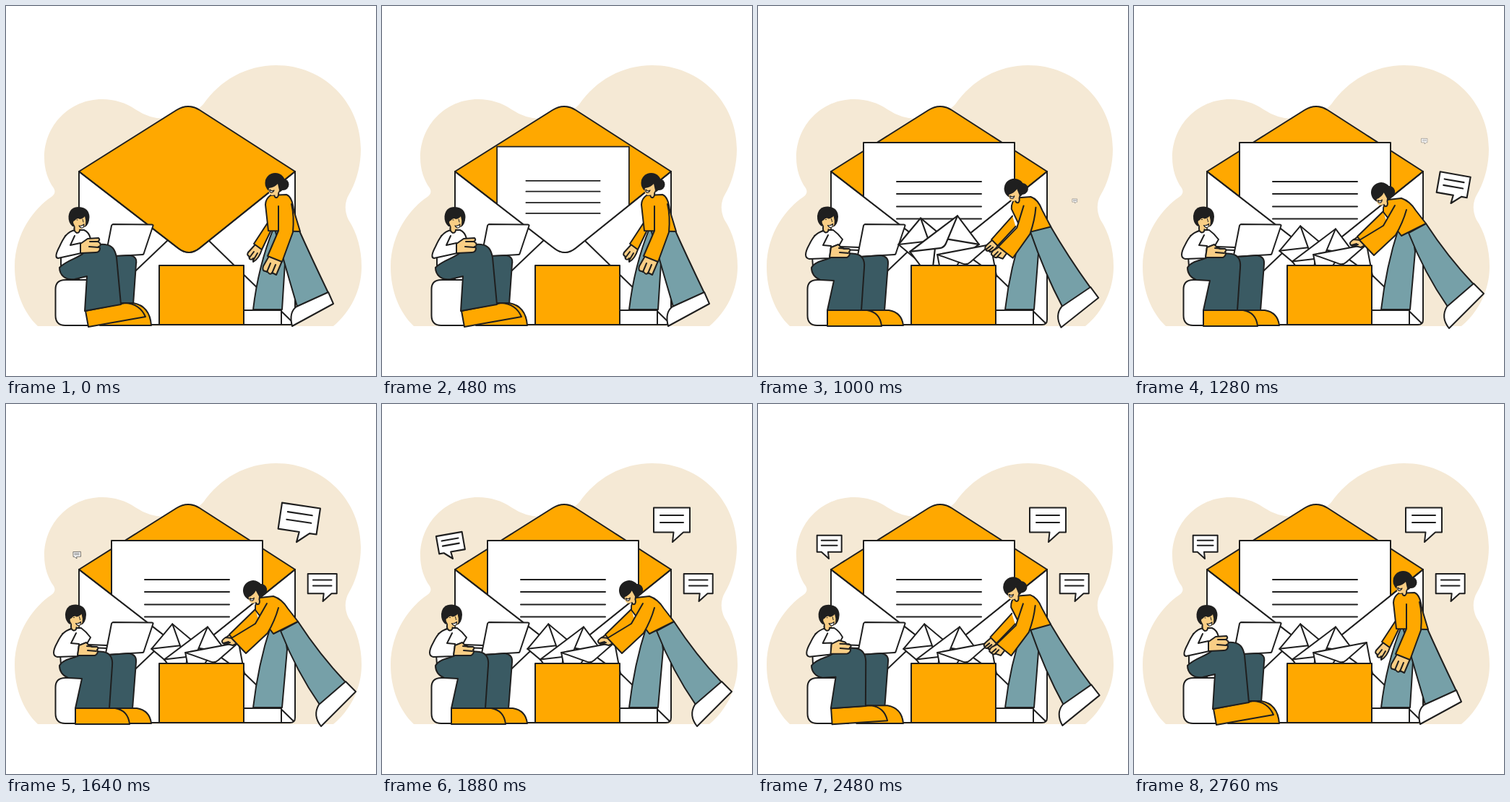
Animation, 512 px wide and 512 px high, one loop 2.88 s. Source, as an HTML page:

```html
<!DOCTYPE html>
<html lang="en">
<head>
<meta charset="utf-8">
<title>Mail</title>
<style>
  html, body { margin: 0; width: 100%; height: 100%; overflow: hidden; background: #fff; }
  svg { display: block; width: 100vw; height: 100vh; }
</style>
</head>
<body>
<svg viewBox="0 0 512 512" fill="none" stroke="#1f1f1f" stroke-width="2" stroke-linecap="round" stroke-linejoin="round">
  <defs>
    <clipPath id="pocket"><path d="M0 0H512V229H400L268 335Q253 347 238 335L101 229H0Z"/></clipPath>
    <g id="mail">
      <path fill="#fff" d="M-37.5 0H37.5V45H-37.5Z"/>
      <path d="M-10 16L-37.5 45M10 16L37.5 45M-37.5 0L-5 19Q0 22 5 19L37.5 0"/>
    </g>
    <g id="note">
      <path fill="#fff" d="M-26 -47.5H24V-13.5H15L0 0L1.5 -13.5H-26Z"/>
      <path d="M-17 -37H15M-17 -27H15"/>
    </g>
  </defs>

  <path fill="#f5e9d5" stroke="none" d="M44 443C24 424 12 394 12 361C12 314 40 279 63 264Q70 259 66 252C58 241 53 226 53 210C53 165 88 129 133 129C150 129 166 134 179 143Q212 165 250 150Q265 145 273 136C296 103 332 82 374 82C440 82 491 134 491 198C491 221 485 243 475 260Q465 277 474 296C486 314 492 337 492 361C492 393 477 423 453 443Z"/>

  <path fill="#fff" d="M101 229V441H393Q400 441 400 434V229Z"/>
  <path d="M224 324L101 441M281 325L398 439"/>
  <path fill="#ffa800" d="M101 229L236 144Q252 134 268 144L400 229L268 335Q253 347 238 335Z"/>
  <g clip-path="url(#pocket)">
    <g id="letter">
      <path fill="#fff" d="M-104.5 -79.5H104.5V115H-104.5Z"/>
      <path d="M-58.5 -25.5H58.5M-58.5 -8.5H58.5M-58.5 9H58.5M-58.5 26H58.5"/>
    </g>
  </g>
  <path d="M101 229L238 335Q253 347 268 335L400 229"/>

  <path fill="#fff" d="M125 379H82Q68.500 379 68.500 392V428Q68.500 442 82 442H125Z"/>
  <path fill="#fff" d="M114 333L140 334V338L114 337Z"/>
  <path fill="#fff" d="M148 302L202 302.5Q204 303 203.5 304L190.5 343Q190 344 189 344L139 347Q137 347 138 345L146 304Q147 302 148 302Z"/>
  <g id="sitter"></g>
  <g id="sitterHead">
    <path fill="#f9ce85" d="M95 304Q93 312 98 314Q103 314 102 307"/>
    <path fill="#1f1f1f" stroke="none" d="M86.500 291Q88 278 101 278Q115 279 115.500 292Q115 303 109 306L92 305Q86 300 86.500 291Z"/>
    <path fill="#f9ce85" stroke="none" d="M95 297Q99 292 102 295Q107 294 109 291Q111 297 110 303Q107 309 101 309Q96 308 95 304Q91 298 95 297Z"/>
    <path fill="#fff" stroke-width="1.200" d="M101 304Q105 305 108 302Q108 308 104 307Q102 306 101 304Z"/>
    <path stroke-width="1" d="M98 296L99 296M106 295L107 299"/>
  </g>

  <path fill="#fff" d="M381 421H326Q312 424 311 441H381Z"/>
  <g id="mails"></g>
  <path fill="#ffa800" d="M212 359H329V441H212Z"/>
  <g id="walker"></g>
  <g id="walkerHead">
    <path fill="#f9ce85" d="M371 259Q371 266 375 265Q378 263 377 256"/>
    <g fill="#1f1f1f" stroke="none"><circle cx="372.500" cy="245" r="14"/><circle cx="383.500" cy="247" r="8"/></g>
    <path fill="#f9ce85" stroke="none" d="M364 252Q372 251 376 246L378 255Q376 262 368 262Q362 261 364 252Z"/>
    <path fill="#fff" stroke-width="1.200" d="M365 254Q368 257 371 255Q369 260 365 257Z"/>
  </g>
  <g id="notes"></g>
</svg>
<script>
const LOOP = 2880, STEP = 40;
const $ = id => document.getElementById(id);
const TEAL = '#3a5a63', SKIN = '#f9ce85', ORANGE = '#ffa800', BLUE = '#76a0a8', WHITE = '#fff';

// Each part: fill, resting pose, active pose (same commands in both).
const sitter = [
  [TEAL, 'M148 346L172 345Q182 347 180 357L176 413L155 418Z', 'M143 347L170 345Q181 347 180 357L175 422L143 422Z'],
  [ORANGE, 'M150 411L176 411Q199 415 201 442L130 442Z', 'M140 421L181 421Q199 424 201 442L140 442Z'],
  [ORANGE, 'M110 422L165 411Q185 412 193 430L114 444Z', 'M96 421L151 421Q169 424 171 443L96 443Z'],
  [WHITE, 'M95 310L108 310Q115 313 117 322L108 343L76 360L76 346L82 318Z', 'M91 310L104 310Q111 315 117 323L102 349L76 361L75 346L78 318Z'],
  [TEAL, 'M74 362C85 351 100 349 107 342C115 332 125 329 137 330C147 331 151 337 153 348L159 413L109 422L112 374L95 378C82 380 74 372 74 362Z',
    'M74 362C80 352 95 352 101 348C110 343 122 341 135 343C145 345 148 352 147 362L143 421L96 421L105 380L86 379C79 376 74 370 74 362Z'],
  [WHITE, 'M96 310C84 312 79 322 74 333Q66 348 72 349L104 342L103 328L89 331L95 318', 'M91 311C79 314 75 322 71 330Q61 348 71 350L99 349L101 332L90 331L97 317'],
  [SKIN, 'M103 329L113 322L128 321Q131 324 127 326L130 328Q132 332 128 333L130 335Q130 341 124 341L103 342Z',
    'M101 334L111 330L115 334Q118 335 119 336L126 336Q129 338 126 340L127 342Q127 346 123 348L99 348Z'],
  ['none', 'M116 326L128 326M115 333L128 334', 'M112 335L125 336M113 341L125 342'],
];
const walker = [
  [BLUE, 'M370 308Q349 360 342 420L382 420L387 340L390 310Z', 'M366 308Q349 360 342 420L382 420L389 340L385 310Z'],
  [BLUE, 'M372 309L405 309Q422 347 446 397L403 416Q390 372 372 309Z', 'M380 314L404 301Q434 347 470 385L434 416Q402 370 380 314Z'],
  [WHITE, 'M402 416L446 396L453 412L396 443Q391 424 402 416Z', 'M433 416L470 384L484 398L436 446Q424 431 433 416Z'],
  [SKIN, 'M345 330L335 341Q333 345 336 346L337 350Q340 352 342 349L342 354Q350 350 354 337Z', 'M310 319L303 324Q299 327 300 329L301 330Q303 331 305 330L306 331Q312 330 316 328Z'],
  ['none', 'M343 340L337 348M348 342L342 352', 'M307 326L301 329M309 328L303 330'],
  [ORANGE, 'M362 300L343 329L354 337L366 312', 'M345 284L309 319L316 328L350 300'],
  [ORANGE, 'M366 262L388 261Q396 264 398 282L407 312L363 311L359 275Q359 267 366 262Z', 'M352 268L370 266Q382 270 390 283L404 301L370 318L345 285Q344 273 352 268Z'],
  [SKIN, 'M364 346L356 360Q354 367 359 367L362 368Q366 373 368 369L374 372L382 353Z', 'M313 324L304 323Q298 327 299 329L300 331Q303 333 306 332L314 334L320 331Z'],
  ['none', 'M366 356L361 368M373 358L368 370', 'M308 329L301 331M310 330L304 332'],
  [ORANGE, 'M377 277L377 311L362 346L382 354L397 313Q399 290 395 274', 'M361 276L345 304L312 324L332 345L362 317Q372 300 377 282'],
];
// x, y, angle, start time
const mails = [[259, 328.5, 40, 780], [249, 331, -37, 700], [285, 337, -10.7, 500]];
// x, y, x scale, y scale, start time
const notes = [[438.5, 273, .8, .8, 960], [402, 191, 1, 1, 1240], [98, 214, -.68, .68, 1560]];

const make = (tag, parent, attrs) => {
  const el = document.createElementNS('http://www.w3.org/2000/svg', tag);
  for (const key in attrs) el.setAttribute(key, attrs[key]);
  return parent.appendChild(el);
};
const build = (id, parts) => parts.map(([fill, rest, active]) => {
  const el = make('path', $(id), { fill });
  return k => el.setAttribute('d', mix(rest, active, k));
});
const mix = (a, b, k) => {
  const ends = b.match(/-?[\d.]+/g);
  let i = 0;
  return a.replace(/-?[\d.]+/g, n => +n + (ends[i++] - n) * k);
};
const progress = (t, start, length) => Math.min(1, Math.max(0, (t - start) / length));
const smooth = p => p < .5 ? 2 * p * p : 1 - 2 * (1 - p) ** 2;
const backOut = p => 1 + 2.7 * (p - 1) ** 3 + 1.7 * (p - 1) ** 2;
const track = (p, keys) => {
  const i = Math.max(1, keys.findIndex(key => key[0] >= p));
  const [p0, v0] = keys[i - 1], [p1, v1] = keys[i];
  return v0 + (v1 - v0) * (p - p0) / (p1 - p0);
};
const noteSize = [[0, 0], [.077, .16], [.385, .7], [.65, 1.12], [.77, 1.07], [1, 1]];

const sitterParts = build('sitter', sitter);
const walkerParts = build('walker', walker);
const mailEls = mails.map(() => make('use', $('mails'), { href: '#mail' }));
const noteEls = notes.map(n => make('use', $('notes'), { href: '#note', 'stroke-width': 2 / n[3] }));
const place = (el, transform, shown = true) => {
  el.setAttribute('transform', transform);
  el.style.display = shown ? '' : 'none';
};

function draw(t) {
  const size = backOut(progress(t, 349, 467));
  const rise = backOut(progress(t, 267, 554));
  place($('letter'), `translate(250.5 ${268.5 + 300 * (1 - rise)}) scale(${size})`, t >= 360);

  const back = smooth(progress(t, 2270, 490));
  const sit = smooth(progress(t, 570, 400)) - back;
  const walk = smooth(progress(t, 760, 440)) - back;
  sitterParts.forEach(set => set(sit));
  walkerParts.forEach(set => set(walk));
  place($('sitterHead'), `translate(${-4.5 * sit} ${-.5 * sit})`);
  place($('walkerHead'), `translate(${-30.5 * walk} ${13 * walk}) rotate(${-16 * walk} 373 245)`);

  mails.forEach(([x, y, angle, start], i) => {
    const e = backOut(progress(t, start, 500));
    const drop = Math.min(60, 160 * (1 - e));
    place(mailEls[i], `translate(${x + .37 * drop} ${y + drop}) rotate(${angle}) scale(${e})`, t > start);
  });
  notes.forEach(([x, y, sx, sy, start], i) => {
    const p = progress(t, start, 520), s = track(p, noteSize);
    const tilt = Math.sign(sx) * 10 * Math.sin(Math.PI * p ** 1.5);
    place(noteEls[i], `translate(${x} ${y}) rotate(${tilt}) scale(${sx * s} ${sy * s})`, p > 0);
  });
}

const begin = performance.now();
function tick() {
  const t = (performance.now() - begin) % LOOP;
  draw(Math.floor(t / STEP) * STEP);
  requestAnimationFrame(tick);
}
tick();
</script>
</body>
</html>
```
